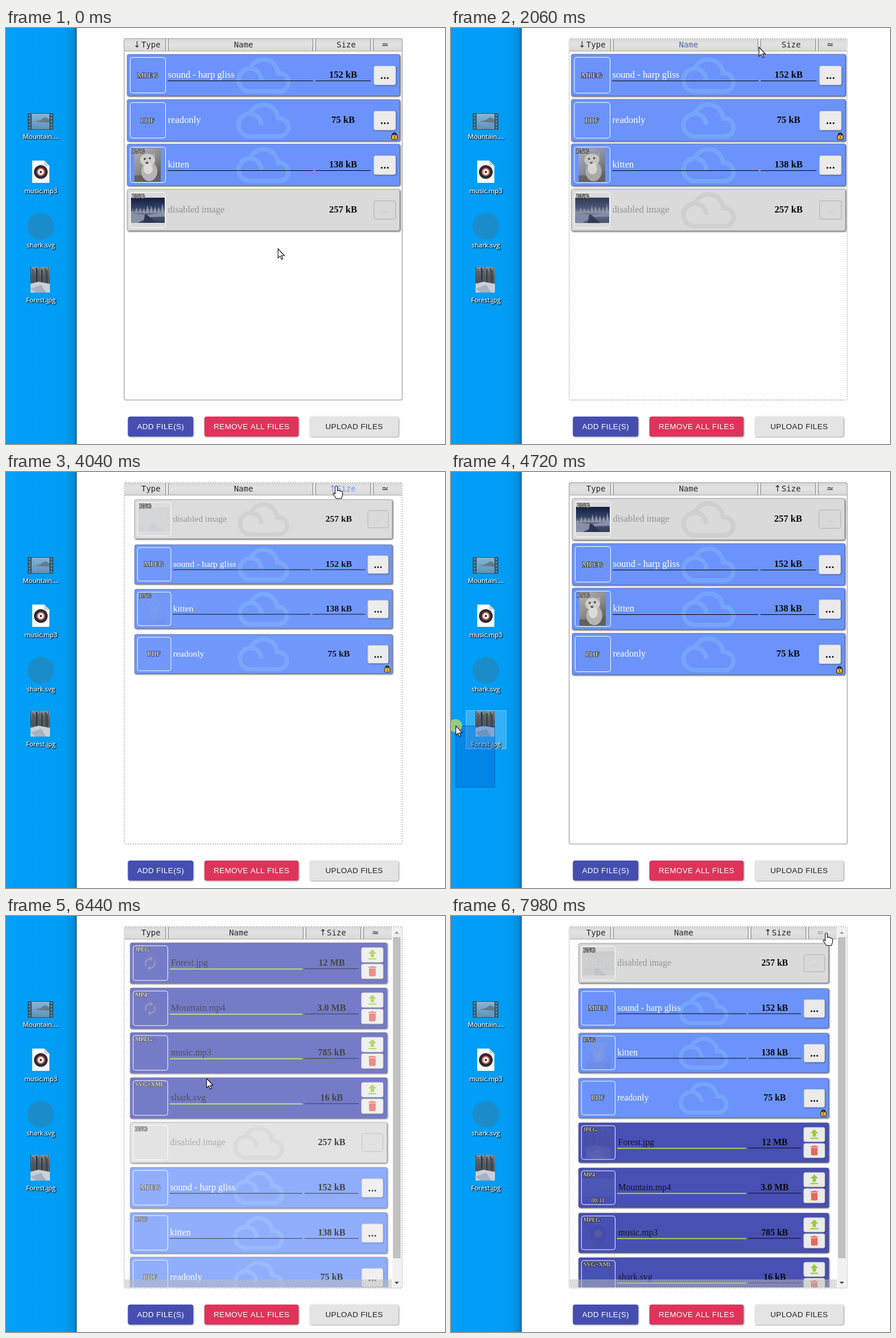
An HTML page with a canvas for the animation above (8 s loop, 769 by 728 pixels).

```html
<!DOCTYPE html>
<html lang="en">
<head>
<meta charset="utf-8">
<title>File list</title>
<style>
html, body { margin: 0; overflow: hidden; background: #fff }
canvas { display: block }
</style>
</head>
<body>
<canvas id="stage" width="769" height="728"></canvas>
<script>
const c = document.getElementById('stage').getContext('2d');
const SERIF = '"Liberation Serif", serif', SANS = '"Liberation Sans", sans-serif';
const MONO = '"DejaVu Sans Mono", monospace', LABEL = '"Open Sans", sans-serif';
const LOOP = 8000, PITCH = 78.6, DROP = 6350;

const files = {
  s: { name: 'sound - harp gliss', size: '152 kB', type: 'MPEG', kind: 'remote' },
  r: { name: 'readonly', size: '75 kB', type: 'PDF', kind: 'remote', locked: true },
  k: { name: 'kitten', size: '138 kB', type: 'PNG', kind: 'remote', thumb: kitten },
  d: { name: 'disabled image', size: '257 kB', type: 'PNG', kind: 'disabled', thumb: night },
  F: { name: 'Forest.jpg', size: '12 MB', type: 'JPEG', kind: 'local', thumb: () => forest(8, 2, 46, 59), slow: true },
  M: { name: 'Mountain.mp4', size: '3.0 MB', type: 'MP4', kind: 'local', thumb: () => mountain(2, 14, 59, 34), slow: true, length: '00:11' },
  u: { name: 'music.mp3', size: '785 kB', type: 'MPEG', kind: 'local', thumb: () => disc(31, 33, 15), length: '00:36' },
  v: { name: 'shark.svg', size: '16 kB', type: 'SVG+XML', kind: 'local', thumb: () => dot(31, 33, 22, '#1b8cca') }
};
const stages = [
  { t: 0, order: 'srkd', arrow: '↓', col: 'Type' },
  { t: 790, order: 'dkrs', arrow: '↑', col: 'Type' },
  { t: 1760, order: 'srkd', arrow: '↓', col: 'Type' },
  { t: 2830, order: 'rksd', arrow: '↓', col: 'Size' },
  { t: 3970, order: 'dskr', arrow: '↑', col: 'Size' },
  { t: DROP, order: 'FMuvdskr', arrow: '↑', col: 'Size' },
  { t: 7900, order: 'dskrFMuv', arrow: '↑', col: 'Size' }
];
const pointer = [[0, 476, 386], [70, 476, 386], [450, 251, 20], [1760, 251, 20], [2060, 539, 33],
  [2360, 578, 24], [4050, 578, 24], [4560, 76, 551], [4720, 8, 444], [5200, 7, 119], [5480, 60, 172],
  [5640, 60, 172], [6190, 351, 284], [7220, 351, 284], [7740, 657, 29], [8000, 657, 29]];
const presses = [[610, 790], [1600, 1760], [2750, 2830], [3810, 3970], [4560, 5220], [5640, DROP], [7740, 7900]];
const hands = [[430, 2040], [2200, 4110], [7660, LOOP]];

const icon = {
  cloud: new Path2D('M19.35 10.04C18.67 6.59 15.64 4 12 4 9.11 4 6.61 5.64 5.36 8.04 2.35 8.36 0 10.9 0 14c0 3.31 2.69 6 6 6h13c2.76 0 5-2.24 5-5 0-2.64-2.05-4.78-4.65-4.96zM19 18H6c-2.21 0-4-1.79-4-4s1.79-4 4-4 4 1.79 4 4h2c0-2.76-1.86-5.08-4.4-5.78C8.61 6.88 10.2 6 12 6c3.03 0 5.5 2.47 5.5 5.5v.5H19c1.65 0 3 1.35 3 3s-1.35 3-3 3z'),
  upload: new Path2D('M5 20h14v-2H5zM5 10h4v6h6v-6h4l-7-7z'),
  trash: new Path2D('M6 19c0 1.1.9 2 2 2h8c1.1 0 2-.9 2-2V7H6zM19 4h-3.5l-1-1h-5l-1 1H5v2h14z'),
  spin: new Path2D('M12 6v3l4-4-4-4v3c-4.42 0-8 3.58-8 8 0 1.57.46 3.03 1.24 4.26L6.7 14.8c-.45-.83-.7-1.79-.7-2.8 0-3.31 2.69-6 6-6zm6.76 1.74L17.3 9.2c.44.84.7 1.79.7 2.8 0 3.31-2.69 6-6 6v-3l-4 4 4 4v-3c4.42 0 8-3.58 8-8 0-1.57-.46-3.03-1.24-4.26z'),
  arrow: new Path2D('M0 0V16L3.7 12.6 6.3 18.5 8.6 17.5 6.1 11.8H11.2Z'),
  hand: new Path2D('M-2 1.5Q0-1.5 2 1.5V8Q4 6.5 5 8.5 7 7.5 8 9.5 10.5 8.5 11 11V16L9 22H0L-5.5 14Q-6 11.5-3.5 12.5L-2 14Z')
};

const clamp = (v, a = 0, b = 1) => Math.min(b, Math.max(a, v));
const within = (t, spans) => spans.some(([a, b]) => t >= a && t < b);

function pointerAt(t) {
  const i = pointer.findIndex(p => p[0] > t), [t0, x0, y0] = pointer[i - 1], [t1, x1, y1] = pointer[i];
  const u = (t - t0) / (t1 - t0), e = u * u * (3 - 2 * u);
  return [x0 + (x1 - x0) * e, y0 + (y1 - y0) * e];
}

function rect(x, y, w, h, fill) { c.fillStyle = fill; c.fillRect(x, y, w, h); }

function box(x, y, w, h, r, fill, stroke, shadow) {
  c.save();
  c.beginPath();
  c.roundRect(x, y, w, h, r);
  if (shadow) { c.shadowColor = `rgba(0,0,0,${shadow})`; c.shadowBlur = 3; c.shadowOffsetY = c.shadowOffsetX = 1; }
  if (fill) { c.fillStyle = fill; c.fill(); }
  c.shadowColor = 'transparent';
  if (stroke) { c.strokeStyle = stroke; c.lineWidth = 1; c.stroke(); }
  c.restore();
}

function text(s, x, y, font, fill, align = 'left') {
  c.font = font; c.fillStyle = fill; c.textAlign = align;
  c.fillText(s, x, y);
}

function outlined(s, x, y, size, align) {
  c.font = `${size}px ${SERIF}`; c.textAlign = align;
  c.lineWidth = 1.7; c.lineJoin = 'round'; c.strokeStyle = '#2a2a2a';
  c.strokeText(s, x, y);
  text(s, x, y, c.font, '#fffdf0', align);
}

function glyph(path, cx, cy, scale, fill, angle = 0) {
  c.save();
  c.translate(cx, cy); c.rotate(angle); c.scale(scale, scale); c.translate(-12, -12);
  c.fillStyle = fill; c.fill(path);
  c.restore();
}

function ellipse(x, y, rx, ry, fill) {
  c.beginPath(); c.ellipse(x, y, rx, ry, 0, 0, 7); c.fillStyle = fill; c.fill();
}
function dot(x, y, r, fill) { ellipse(x, y, r, r, fill); }

function poly(fill, ...p) {
  c.beginPath();
  for (let i = 0; i < p.length; i += 2) c.lineTo(p[i], p[i + 1]);
  c.fillStyle = fill; c.fill();
}

function gradient(x0, y0, x1, y1, ...stops) {
  const g = c.createLinearGradient(x0, y0, x1, y1);
  for (let i = 0; i < stops.length; i += 2) g.addColorStop(stops[i], stops[i + 1]);
  return g;
}

// Pictures
function kitten() {
  rect(8, 2, 46, 59, gradient(8, 2, 54, 61, 0, '#b9b7b4', .5, '#8b8987', 1, '#4c4a48'));
  rect(8, 50, 46, 11, '#63615e');
  poly('#a9a7a4', 19, 22, 18, 11, 26, 16, 36, 14, 44, 10, 44, 24);
  ellipse(34, 43, 14, 17, '#b7b5b2');
  ellipse(31, 23, 13, 11, '#cfcdca');
  ellipse(32, 38, 8, 10, '#dddbd8');
  dot(26, 21, 1.8, '#3a3938'); dot(35, 20, 1.8, '#3a3938'); ellipse(30, 28, 2.5, 2, '#5c5856');
}

function night() {
  rect(2, 10, 59, 44, gradient(0, 10, 0, 54, 0, '#141d3c', .4, '#34436a', .58, '#6f7688', .7, '#4b5572', 1, '#333d5a'));
  for (let i = 0; i < 9; i++) {
    const x = 5 + i * 6.5, h = 4 + i + i * 5 % 7;
    poly('#8e98ad', x - 3, 37, x, 37 - h, x + 3, 37);
  }
  poly('#8891a8', 2, 37, 30, 40, 61, 36, 61, 43, 34, 44, 14, 54, 2, 54);
  poly('#2c3550', 26, 40, 30, 40, 46, 54, 24, 54);
}

function forest(x, y, w, h) {
  rect(x, y, w, h, gradient(0, y, 0, y + h, 0, '#8b949a', .4, '#596166', 1, '#596166'));
  for (let i = 0; i < 11; i++)
    rect(x + w * i / 11, y + h * (i * 7 % 5) * .04, w * (.03 + i * 3 % 5 * .012), h * .6, i % 3 ? '#4b5256' : '#30363a');
  poly('#c9d0d9', x, y + h * .66, x + w * .4, y + h * .58, x + w, y + h * .66, x + w, y + h, x, y + h);
  poly('#a7b2c0', x, y + h * .84, x + w * .55, y + h * .7, x + w * .8, y + h, x + w * .25, y + h);
}

function mountain(x, y, w, h) {
  rect(x, y, w, h, gradient(0, y, 0, y + h, 0, '#86b4d6', 1, '#5f93b8'));
  poly('#647c88', x + w * .18, y + h * .52, x + w * .5, y + h * .42, x + w * .78, y + h * .22, x + w, y + h * .38, x + w, y + h * .58);
}

function disc(x, y, r) {
  dot(x, y, r, '#2d2b35');
  dot(x, y, r * .6, '#d8705c');
  dot(x, y, r * .42, '#f5f5f5');
  dot(x, y, r * .16, '#2d2b35');
}

// Desktop
function desktopIcons() {
  rect(38, 149, 45, 29, '#33566a');
  for (let i = 0; i < 5; i++) { rect(40, 151 + i * 5.5, 3, 3, '#5f8ba3'); rect(78, 151 + i * 5.5, 3, 3, '#5f8ba3'); }
  mountain(45, 150, 31, 27);
  poly('#fff', 46, 232, 67, 232, 76, 241, 76, 271, 46, 271);
  poly('#cfd3d8', 67, 232, 76, 241, 67, 241);
  disc(61, 252, 12);
  dot(61, 347, 23.5, '#1b8cca');
  forest(43, 418, 34, 45);
  c.save();
  c.shadowColor = '#000'; c.shadowBlur = 2; c.shadowOffsetX = c.shadowOffsetY = 1;
  ['Mountain....', 'music.mp3', 'shark.svg', 'Forest.jpg'].forEach((s, i) => {
    for (let pass = 0; pass < 2; pass++)
      text(s, 61, Math.round(194 + i * 95.2), `11.3px ${LABEL}`, '#fff', 'center');
  });
  c.restore();
}

function desktop(t, [px, py]) {
  rect(0, 0, 124, 728, gradient(0, 0, 124, 0, 0, '#009ff8', .82, '#009cf4', .95, '#068dda', 1, '#0a72b4'));
  rect(123, 0, 1, 728, '#2b6490');
  const banding = t >= 4560 && t < 5220;
  for (let i = 0; i < 4; i++) {
    const top = 132 + 95 * i;
    const picked = banding ? py < top + 67 && px < 76 : t >= 5220 && t < DROP;
    if (picked) box(26.5, top + .5, 70, 67, 0, 'rgba(255,255,255,.2)', 'rgba(255,255,255,.4)');
  }
  desktopIcons();
  if (banding) box(px + .5, py + .5, 76 - px, 551 - py, 0, 'rgba(0,90,200,.35)', 'rgba(0,80,180,.7)');
}

// File list
function header(t, stage, shift) {
  rect(208, 19, 485 - shift, 21, gradient(0, 19, 0, 40, 0, '#d8d8d8', .45, '#e2e2e2', 1, '#d8d8d8'));
  rect(208, 40, 485 - shift, 1, '#a8a8a8');
  for (const x of [280, 538 - shift, 639 - shift]) {
    rect(x, 19, 4, 21, '#e8e8e8');
    rect(x - 1, 19, 1, 21, '#858585'); rect(x + 4, 19, 1, 21, '#858585');
  }
  const ink = (on, off) => {
    const k = Math.min(clamp((t - on) / 150), clamp((off + 150 - t) / 150));
    return `rgb(${40 + 80 * k},${40 + 108 * k},${40 + 205 * k})`;
  };
  const type = ink(420, 1800), size = ink(2180, 4110), font = `14px ${MONO}`;
  const sortFont = '15px "DejaVu Sans", sans-serif';
  text('Type', 237, 34, font, type);
  text('Name', 416 - shift / 2, 34, font, ink(1850, 2000), 'center');
  text('Size', 579 - shift, 34, font, size);
  text(t < 7900 ? '≃' : '≂', 664 - shift, 34, sortFont, ink(7640, 9000), 'center');
  if (stage.col === 'Type') text(stage.arrow, 229.5, 34, sortFont, type, 'center');
  else text(stage.arrow, 572 - shift, 34, sortFont, size, 'center');
}

function lock(x, y) {
  c.lineWidth = 2; c.strokeStyle = '#111';
  c.beginPath(); c.arc(x, y - 2, 3, Math.PI, 0); c.stroke();
  box(x - 5, y - 2, 10, 8, 1, '#f2b62c', '#111');
  rect(x - .7, y, 1.4, 4, '#513a00');
}

// Drawn at the place of the first row; the caller moves and scales it.
function row(f, t, dt, stage, shift) {
  const local = f.kind === 'local', off = f.kind === 'disabled';
  const right = 690 - shift, mid = (212 + right) / 2;
  box(212, 46, right - 212, 73, 3, local ? '#4850b4' : off ? '#dadada' : '#6b93fb', null, .75);
  box(212.5, 46.5, right - 213, 72, 3, null, 'rgba(60,60,80,.3)');
  if (!local && (!off || (t >= 790 && t < 7900)))
    glyph(icon.cloud, mid, 83, (right - 212) / 478 * 3.96, off ? '#cfcfcf' : '#76a4fc');

  if (f.thumb) {
    const dropped = stage.t === DROP;
    const wait = f.slow && dropped ? 500 : dropped ? 100 : f === files.k && stage.t === 790 ? 245 : 60;
    const shown = clamp((dt - wait) / 280);
    c.save();
    c.translate(217, 51); c.globalAlpha = shown;
    f.thumb();
    c.restore();
    if (f.slow && dropped && shown < 1) {
      c.globalAlpha = 1 - shown;
      glyph(icon.spin, 248, 83, 1.2, '#777a9c', (t - 6440) / 1000 * Math.PI * 2);
    }
    if (f.length) {
      c.globalAlpha = f.slow && !dropped ? 1 : shown;
      outlined(f.length, 248, 109, 11, 'center');
    }
    c.globalAlpha = 1;
  }
  box(217.5, 51.5, 62, 62, 4, null, '#fff');
  if (f.thumb || local) outlined(f.type, 221, 62, 11, 'left');
  else outlined(f.type, 248, 86.5, 13, 'center');

  const nameX = local ? 285 : 283.5;
  text(f.name, nameX, 87, `16.5px ${SERIF}`, local ? '#151530' : off ? '#949494' : '#fff');
  text(f.size, 590.5 - shift, 87, `bold 16.5px ${SERIF}`, '#080808', 'center');
  if (!off && !f.locked) {
    rect(283, 92, 255 - shift, local ? 2 : 1, local ? '#a9d83c' : '#000');
    rect(542 - shift, 92, 97, 1, '#000');
  }

  const x = 644 - shift;
  if (local) {
    box(x, 54.5, 39, 26.5, 3, '#ebebeb', '#bbb', .3);
    box(x, 84, 39, 26.5, 3, '#ebebeb', '#bbb', .3);
    glyph(icon.upload, x + 19.5, 67.5, 1.04, '#9acd32');
    glyph(icon.trash, x + 19.5, 97, 1, '#e4695e');
  } else if (off) {
    box(x + .5, 66.5, 38, 32, 3, '#d8d8d8', '#b0b0b0');
    text('...', x + 19.5, 87, `13px ${SANS}`, '#b4b4b4', 'center');
  } else {
    box(x + .5, 66.5, 38, 33, 3, '#ebebeb', '#c4c4c4', .45);
    text('...', x + 19.5, 89, `bold 19px ${SANS}`, '#111', 'center');
  }
  if (f.locked) lock(680.5 - shift, 110);
}

function list(t, stage) {
  const many = stage.order.length > 4, shift = many ? 17 : 0, dropped = stage.t === DROP;
  const dt = stage.t ? t - stage.t : 1e4, phase = dropped ? dt + 45 : dt;
  const scale = 1 - .096 * Math.exp(-phase / 283) * Math.cos(phase / 140) * clamp(1 - phase / 450);
  const mid = 451 - shift / 2;
  c.save();
  c.beginPath(); c.rect(208, 41, 485 - shift, 609); c.clip();
  [...stage.order].forEach((key, i) => {
    c.save();
    c.translate(mid, 82.5 + Math.round(i * PITCH)); c.scale(scale, scale); c.translate(-mid, -82.5);
    row(files[key], t, dt, stage, shift);
    c.restore();
  });
  const veil = dropped ? .5 - dt / 360 : .4 - dt / 200;
  rect(208, 41, 485, 609, `rgba(255,255,255,${clamp(veil)})`);
  if (many) rect(208, 636, 469, 14, 'rgba(190,190,190,.5)');
  c.restore();
  header(t, stage, shift);
  if (many) {
    rect(677, 19, 16, 631, '#f1f1f1');
    rect(678, 37, 13, 562, '#c1c1c1');
    poly('#999', 680.5, 31, 684.5, 27, 688.5, 31);
    poly('#444', 680.5, 640, 684.5, 644, 688.5, 640);
  }
  const dotted = (t >= 610 && t < 4200) || t >= 5910;
  c.save();
  c.lineWidth = dotted ? 1.8 : 1.6; c.strokeStyle = dotted ? '#c2c2c2' : '#b2b2b2';
  if (dotted) c.setLineDash([2, 2]);
  c.beginPath(); c.roundRect(207, 18.5, 487, 632.5, 3); c.stroke();
  c.restore();
}

function button(label, x, w, fill, color) {
  box(x, 680, w, 35, 4, fill, null, .4);
  c.letterSpacing = '.4px';
  text(label, x + w / 2 + .2, 702, `13.4px ${SANS}`, color, 'center');
  c.letterSpacing = '0px';
}

function cursor(t, [x, y]) {
  if (within(t, presses)) dot(x, y, 11.5, 'rgba(250,235,50,.6)');
  c.save();
  c.translate(x + .5, y + .5);
  const shape = within(t, hands) ? icon.hand : icon.arrow;
  c.fillStyle = '#fff'; c.fill(shape);
  c.strokeStyle = '#111'; c.lineWidth = 1.1; c.stroke(shape);
  c.restore();
}

function draw() {
  const t = performance.now() % LOOP, at = pointerAt(t);
  const stage = stages.findLast(s => s.t <= t);
  rect(0, 0, 769, 728, '#fff');
  desktop(t, at);
  list(t, stage);
  button('ADD FILE(S)', 213.5, 114.5, '#454eb0', '#fff');
  button('REMOVE ALL FILES', 347.5, 165, '#df3459', '#fff');
  button('UPLOAD FILES', 532, 155.5, '#e4e4e4', '#222');
  if (t >= 5660 && t < DROP) {
    c.save();
    c.globalAlpha = .5; c.translate(at[0] - 60, at[1] - 172);
    desktopIcons();
    c.restore();
  }
  cursor(t, at);
  requestAnimationFrame(draw);
}
draw();
</script>
</body>
</html>
```
